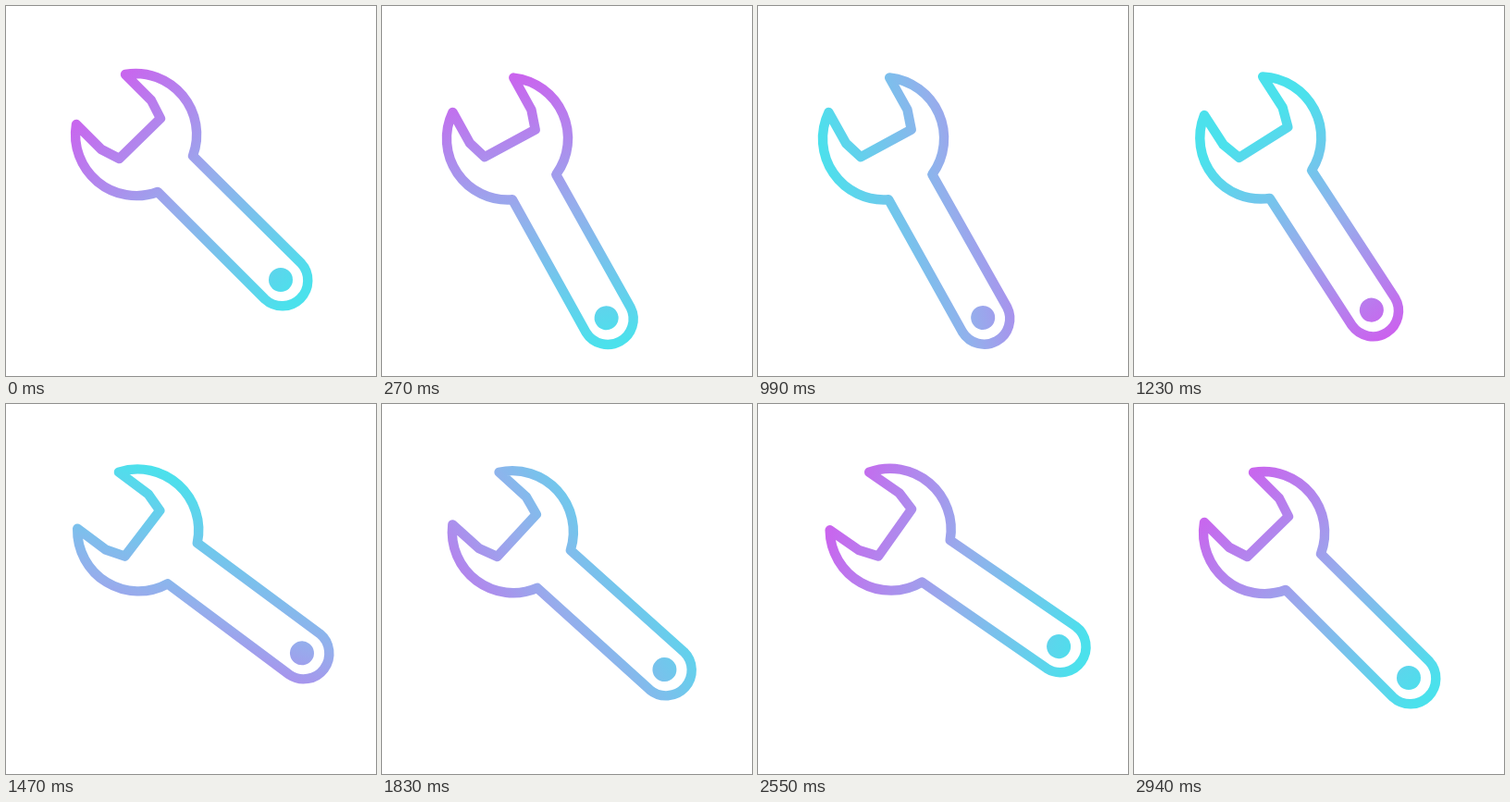
An HTML page that plays this animation: 400 by 400 pixels, repeating every 4.47 s.

```html
<!DOCTYPE html>
<html lang="en">
<head>
<meta charset="utf-8">
<title>Wrench</title>
<style>
  html, body { margin: 0; width: 100%; height: 100%; overflow: hidden; background: #fff; }
  svg { display: block; width: 100%; height: 100%; }
</style>
</head>
<body>
<svg viewBox="0 0 400 400">
  <defs>
    <linearGradient id="tint" gradientUnits="userSpaceOnUse">
      <stop offset="0" stop-color="#cb62ee"/>
      <stop offset=".5" stop-color="#95aeec"/>
      <stop offset="1" stop-color="#4be1ec"/>
    </linearGradient>
  </defs>
  <g id="wrench">
    <path fill="none" stroke="url(#tint)" stroke-width="10.4" stroke-linejoin="round"
      d="M129 74A66 66 0 0 1 202 162L319 278A27.6 27.6 0 0 1 280 317L164 201A66 66 0 0 1 76 128L103 155L122.500 165L167 121.500L157 102Z"/>
    <circle cx="297" cy="296" r="13" fill="url(#tint)"/>
  </g>
</svg>
<script>
  const LOOP = 4470, STEP = 30, REST = 2940, PIVOT = 123, CENTER = 200;
  const HIGH = 22.5, LOW = -10.9;

  // time, angle, ease used to arrive there
  const swing = [
    [0, 0, 0.5], [155, HIGH, 0.5], [715, LOW, 0.3], [1085, HIGH, 0.62],
    [1640, LOW, 0.3], [2075, HIGH, 0.62], [2500, LOW, 0.3], [REST, 0, 0.3]
  ];
  // time, turn of the gradient in degrees
  const turn = [[0, 0], [510, 50], [990, 109], [1470, 251], [1830, 287], [2220, 319], [REST, 360]];

  const wrench = document.getElementById('wrench');
  const tint = document.getElementById('tint');

  // y of cubic-bezier(k, 0, 1 - k mirrored as k, 1) at x
  function ease(x, k) {
    let lo = 0, hi = 1;
    for (let i = 0; i < 24; i++) {
      const u = (lo + hi) / 2;
      if (3 * k * u * (1 - u) + u ** 3 < x) lo = u; else hi = u;
    }
    return lo * lo * (3 - 2 * lo);
  }

  function segment(keys, t) {
    let i = 1;
    while (i < keys.length - 1 && t > keys[i][0]) i++;
    return i;
  }

  function swingAt(t) {
    const i = segment(swing, t);
    const [t0, a] = swing[i - 1], [t1, b, k] = swing[i];
    return a + (b - a) * ease((t - t0) / (t1 - t0), k);
  }

  function slope(i) {
    const a = turn[i - 1], b = turn[i + 1];
    return a && b ? (b[1] - a[1]) / (b[0] - a[0]) : 0;
  }

  // smooth Hermite curve through the turn keys
  function turnAt(t) {
    const i = segment(turn, t);
    const [t0, a] = turn[i - 1], [t1, b] = turn[i];
    const d = t1 - t0, u = (t - t0) / d, v = 1 - u;
    return a * v * v * (1 + 2 * u) + b * u * u * (3 - 2 * u)
      + d * u * v * (slope(i - 1) * v - slope(i) * u);
  }

  function draw(now) {
    const t = Math.min(Math.floor((now % LOOP) / STEP) * STEP, REST);
    wrench.setAttribute('transform', `rotate(${swingAt(t)} ${PIVOT} ${PIVOT})`);

    const phi = turnAt(t) * Math.PI / 180;
    const dx = Math.cos(phi + Math.PI / 4), dy = Math.sin(phi + Math.PI / 4);
    // the purple end lies further out while the gradient is reversed
    const back = 160 - 10 * Math.cos(phi);
    const front = 98 + 62 * Math.max(0, Math.cos(phi));
    tint.setAttribute('x1', CENTER - back * dx);
    tint.setAttribute('y1', CENTER - back * dy);
    tint.setAttribute('x2', CENTER + front * dx);
    tint.setAttribute('y2', CENTER + front * dy);
  }

  const start = performance.now();
  function tick() {
    draw(performance.now() - start);
    requestAnimationFrame(tick);
  }
  tick();
</script>
</body>
</html>
```
